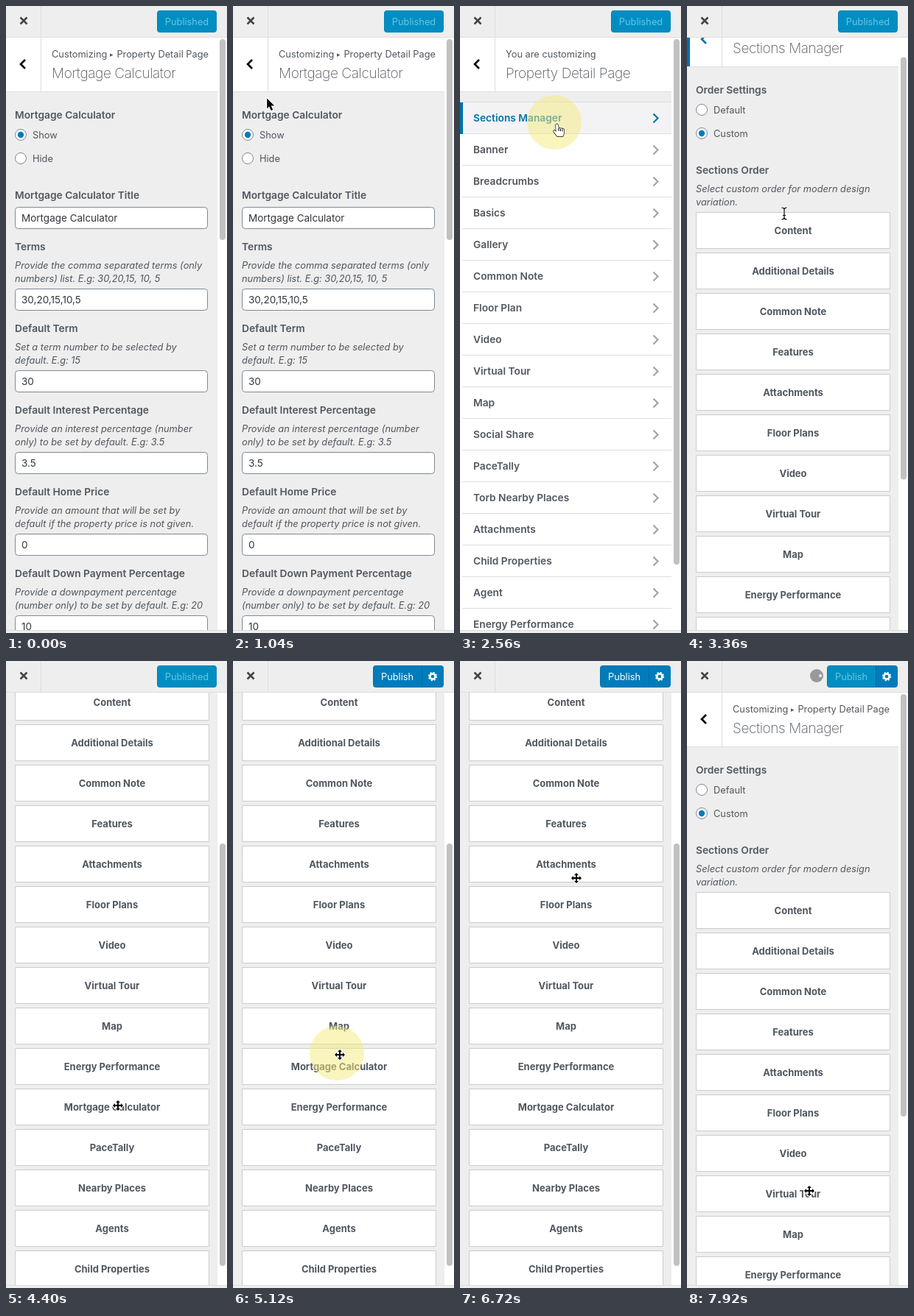
These frames come from a looping animation (300 by 852 pixels, 8 s). An HTML page with a canvas:

```html
<!DOCTYPE html>
<html lang="en">
<head>
<meta charset="utf-8">
<title>Customizer</title>
<style>
html, body { margin: 0; width: 100%; height: 100%; overflow: hidden; background: #eee; }
canvas { display: block; width: 300px; height: 852px; }
</style>
</head>
<body>
<canvas id="stage"></canvas>
<script>
const LOOP = 8000, STEP = 80, PANE = 287;
const BLUE = '#0073aa', INK = '#50575f', LINE = '#ddd';
const canvas = document.getElementById('stage');
const ctx = canvas.getContext('2d');
const ratio = window.devicePixelRatio || 1;
canvas.width = 300 * ratio;
canvas.height = 852 * ratio;

const sections = ['Sections Manager', 'Banner', 'Breadcrumbs', 'Basics', 'Gallery', 'Common Note',
  'Floor Plan', 'Video', 'Virtual Tour', 'Map', 'Social Share', 'PaceTally', 'Torb Nearby Places',
  'Attachments', 'Child Properties', 'Agent', 'Energy Performance', 'Mortgage Calculator', 'Similar Properties'];
const cards = ['Content', 'Additional Details', 'Common Note', 'Features', 'Attachments', 'Floor Plans',
  'Video', 'Virtual Tour', 'Map', 'Energy Performance', 'Mortgage Calculator', 'PaceTally',
  'Nearby Places', 'Agents', 'Child Properties', 'Similar Properties'];
const fields = [
  ['Terms', 'Provide the comma separated terms (only', 'numbers) list. E.g: 30,20,15, 10, 5', '30,20,15,10,5'],
  ['Default Term', 'Set a term number to be selected by', 'default. E.g: 15', '30'],
  ['Default Interest Percentage', 'Provide an interest percentage (number', 'only) to be set by default. E.g: 3.5', '3.5'],
  ['Default Home Price', 'Provide an amount that will be set by', 'default if the property price is not given.', '0'],
  ['Default Down Payment Percentage', 'Provide a downpayment percentage', '(number only) to be set by default. E.g: 20', '10']
];

// Timelines: [time, value...]
const scrollTrack = [[1600, 99], [2000, 0], [3280, 0], [3360, 34], [3600, 226], [4000, 226], [4240, 283],
  [6720, 283], [6880, 0]];
const pointerTrack = [[160, 180, 572], [480, 197, 441], [560, 197, 441], [1120, 21, 73], [2000, 21, 73],
  [2160, 120, 192], [2320, 132, 160], [2960, 132, 160], [3200, 132, 282], [3680, 132, 282],
  [3920, 150, 660], [4000, 150, 660], [4400, 152, 604], [4960, 149, 590], [5120, 145, 535],
  [5360, 144, 545], [5440, 144, 548], [5600, 145, 603], [5840, 146, 603], [6000, 145, 548],
  [6320, 146, 548], [6480, 146, 603], [6560, 147, 600], [6720, 158, 295], [6960, 158, 295],
  [7360, 222, 22], [7520, 222, 22], [7840, 166, 715], [7920, 166, 720]];
const drags = [[4960, 5120], [5440, 5600], [5840, 6000], [6320, 6480]];
const clicks = [[1360, 1480], [2560, 2680], [7360, 7520], ...drags.map(([a, b]) => [a, b + STEP])];

const shapes = {
  arrow: 'M0 0v14l3-3 2.5 5.5 2.5-1-2.5-5.5h4.5z',
  hand: 'M-2 1.5q1.5-2.5 3 0l1 5q1-1 2.5 0 1.5-.8 2.5.5 2-.3 2.3 1.5v3.5l-1.5 5h-8l-4.5-6q-1-2 1.5-2l1.7 2z',
  beam: 'M-3.5-8q3 0 3.5 2q.5-2 3.5-2M0-6v12M-3.5 8q3 0 3.5-2q.5 2 3.5 2M-2 2.5h4',
  move: 'M0-7l3 3h-2v3h3v-2l3 3-3 3v-2h-3v3h2l-3 3-3-3h2v-3h-3v2l-3-3 3-3v2h3v-3h-2z'
};

const clamp = v => Math.min(1, Math.max(0, v));
const ease = v => { v = clamp(v); return v * v * (3 - 2 * v); };
const within = (t, [a, b]) => t >= a && t < b;

function at(track, t) {
  const i = track.findIndex(key => key[0] > t);
  if (i < 0) return track[track.length - 1].slice(1);
  if (i === 0) return track[0].slice(1);
  const a = track[i - 1], b = track[i], p = (t - a[0]) / (b[0] - a[0]);
  return a.slice(1).map((v, k) => v + (b[k + 1] - v) * p);
}

function rect(x, y, w, h, fill) {
  ctx.fillStyle = fill;
  ctx.fillRect(x, y, w, h);
}

function box(x, y, w, h, radius, fill, border) {
  ctx.beginPath();
  ctx.roundRect(x + .5, y + .5, w - 1, h - 1, radius);
  ctx.fillStyle = fill;
  ctx.fill();
  ctx.strokeStyle = border;
  ctx.lineWidth = 1;
  ctx.stroke();
}

function disc(x, y, r, fill) {
  ctx.beginPath();
  ctx.arc(x, y, r, 0, 7);
  ctx.fillStyle = fill;
  ctx.fill();
}

function text(str, x, baseline, font, color = INK, align = 'left') {
  ctx.font = font + ' Inter, sans-serif';
  ctx.fillStyle = color;
  ctx.textAlign = align;
  ctx.fillText(str, x, baseline);
}

function stroke(path, x, y, color, width) {
  ctx.save();
  ctx.translate(x, y);
  ctx.strokeStyle = color;
  ctx.lineWidth = width;
  ctx.stroke(new Path2D(path));
  ctx.restore();
}

const label = (str, y) => text(str, 12, y, '600 13.75px');
const note = (str, y) => text(str, 12, y, 'italic 400 12.8px');

function radio(str, y, checked) {
  ctx.beginPath();
  ctx.arc(20, y, 7.5, 0, 7);
  ctx.fillStyle = '#fff';
  ctx.fill();
  ctx.strokeStyle = '#7e8993';
  ctx.lineWidth = 1;
  ctx.stroke();
  if (checked) disc(20, y, 4.2, '#007cba');
  text(str, 36, y + 5, '400 12.8px');
}

function input(str, y) {
  box(12, y, 262, 30, 4, '#fff', '#7e8993');
  text(str, 21, y + 20, '400 13.5px', '#32373c');
}

function header(trail, title, active) {
  rect(0, 43, PANE, 73, '#fff');
  rect(0, 116, PANE, 1, LINE);
  rect(47, 43, 1, 73, LINE);
  if (active) rect(0, 43, 4, 73, BLUE);
  stroke('M3-6l-6 6 6 6', 23, 79, active ? BLUE : '#000', 2.6);
  if (trail) {
    text('Customizing', 62, 70, '400 12.8px');
    text('▸', 141, 69, '400 9px');
    text('Property Detail Page', 275, 70, '400 12.8px', INK, 'right');
  } else {
    text('You are customizing', 62, 70, '400 12.8px');
  }
  ctx.letterSpacing = '-.4px';
  text(title, 62, 98, '200 19px');
  ctx.letterSpacing = '0px';
}

function calculatorPage(s) {
  header(true, 'Mortgage Calculator', s.overBack);
  label('Mortgage Calculator', 153);
  radio('Show', 175, true);
  radio('Hide', 207, false);
  label('Mortgage Calculator Title', 262);
  input('Mortgage Calculator', 273);
  fields.forEach(([name, first, second, value], i) => {
    const y = 111 * i;
    label(name, 332 + y);
    note(first, 357 + y);
    note(second, 375 + y);
    input(value, 384 + y);
  });
}

function listPage(s) {
  header(false, 'Property Detail Page', s.overBack);
  rect(0, 130, PANE, 1, LINE);
  sections.forEach((name, i) => {
    const y = 131 + 43 * i;
    const active = i === s.row || name === 'Mortgage Calculator';
    rect(0, y, PANE, 43, active ? '#f3f3f5' : '#fff');
    rect(3, y + 42, PANE - 3, 1, LINE);
    if (active) rect(0, y, 4, 43, BLUE);
    text(name, 18, y + 26, '600 13.75px', active ? BLUE : INK);
    stroke('M-3.5-6l6 6-6 6', 266, y + 21.5, active ? BLUE : '#a0a5aa', 2.2);
  });
}

function card(name, y) {
  box(12, y, 264, 50, 0, '#fff', '#ccc');
  text(name, 144, y + 30, '700 13px', INK, 'center');
}

function sortPage(s) {
  header(true, 'Sections Manager', s.focusBack);
  label('Order Settings', 153);
  radio('Default', 175, false);
  radio('Custom', 207, true);
  label('Sections Order', 262);
  note('Select custom order for modern design', 287);
  note('variation.', 305);
  // place: 0 = calculator below its neighbour, 1 = above it
  const [upper, lower] = [9, 10];
  cards.forEach((name, i) => {
    let slot = i;
    if (i === upper) slot += Math.round(s.place);
    if (i !== lower) card(name, 314 + 55 * slot);
  });
  card(cards[lower], 314 + 55 * (lower - s.place));
}

function pane(draw, x, scroll, s) {
  if (Math.abs(x) >= PANE) return;
  ctx.save();
  ctx.beginPath();
  ctx.rect(0, 43, PANE, 805);
  ctx.clip();
  ctx.translate(x, -scroll);
  rect(0, 43, PANE, 1400, '#eee');
  draw(s);
  ctx.restore();
}

function gear(x, y) {
  ctx.strokeStyle = '#fff';
  for (const [r, width, dash] of [[3.6, 2.6, []], [5.3, 1.8, [2.08, 2.08]]]) {
    ctx.beginPath();
    ctx.arc(x, y, r, 0, Math.PI * 2);
    ctx.lineWidth = width;
    ctx.setLineDash(dash);
    ctx.stroke();
  }
  ctx.setLineDash([]);
}

function topBar(t, changed, saving) {
  rect(0, 0, 300, 42, '#eee');
  rect(0, 42, 300, 1, LINE);
  rect(47, 0, 1, 42, LINE);
  stroke('M-4.5-4.5l9 9M4.5-4.5l-9 9', 24, 20, '#444', 2.5);
  if (!changed) {
    box(205, 6, 81, 30, 3, '#008ec2', '#0081b4');
    text('Published', 245.5, 26, '400 12.8px', '#66c6e4', 'center');
    return;
  }
  box(190, 6, 96, 30, 3, '#007cba', '#0073aa');
  if (saving) {
    rect(191, 7, 66, 28, '#008ec2');
    const angle = (t - 7920) / 1000 * Math.PI * 2;
    disc(176, 20, 9, '#999');
    disc(176 + 5 * Math.cos(angle), 20 + 5 * Math.sin(angle), 2, '#eee');
  }
  rect(256, 7, 1, 28, '#006ba1');
  text('Publish', 223, 26, '400 12.8px', saving ? '#66c6e4' : '#fff', 'center');
  gear(271, 21);
}

function pointer(kind, x, y) {
  const path = new Path2D(shapes[kind]);
  ctx.save();
  ctx.translate(x, y);
  ctx.lineJoin = 'round';
  ctx.strokeStyle = kind === 'hand' ? '#000' : '#fff';
  ctx.lineWidth = kind === 'hand' ? 1.3 : 2.4;
  ctx.stroke(path);
  if (kind === 'beam') {
    ctx.strokeStyle = '#000';
    ctx.lineWidth = 1.2;
    ctx.stroke(path);
  } else {
    ctx.fillStyle = kind === 'hand' ? '#fff' : '#000';
    ctx.fill(path);
  }
  if (kind === 'hand') stroke('M2 6v4M4.5 7v3M7 7.5v3', 0, 0, '#000', 1);
  ctx.restore();
}

function pointerKind(x, y, scroll, s) {
  if (y < 42) return x > 190 ? 'hand' : 'arrow';
  if (s.overBack || s.row >= 0) return 'hand';
  if (s.sorting && y + scroll > 320) return 'move';
  if (s.sorting && y + scroll > 234) return 'beam';
  return 'arrow';
}

function draw(t) {
  const [x, y] = at(pointerTrack, t);
  const back = ease((t - 1360) / 200), open = ease((t - 2560) / 240);
  const scroll = back < 1 && t < 1440 ? 0 : at(scrollTrack, t)[0];
  const done = drags.filter(d => t >= d[1]).length;
  const drag = drags.find(d => within(t, d));
  const progress = drag ? (t - drag[0]) / (drag[1] - drag[0]) : 0;
  const onList = back > .5 && open < .5;
  const overBack = t >= 160 && x < 47 && y > 43 && y + scroll < 117;
  const s = {
    overBack,
    focusBack: overBack || t < 4960,
    row: onList ? Math.floor((y + scroll - 131) / 43) : -1,
    sorting: open > .5,
    place: done % 2 ? 1 - progress : progress
  };

  rect(0, 0, 300, 852, '#eee');
  rect(PANE, 43, 13, 805, '#fff');
  rect(PANE - 1, 43, 1, 805, LINE);
  pane(calculatorPage, PANE * back, 0, s);
  pane(listPage, PANE * (back - 1 - open), scroll, s);
  pane(sortPage, PANE * (1 - open), scroll, s);

  const [length, rate] = s.sorting ? [574, .717] : onList ? [714, .88] : [273, 0];
  ctx.beginPath();
  ctx.roundRect(290, 45 + scroll * rate, 8, length, 4);
  ctx.fillStyle = '#c1c1c1';
  ctx.fill();

  rect(0, 848, 300, 1, LINE);
  rect(0, 849, 300, 3, '#eee');
  topBar(t, done > 0, t >= 7520);

  if (clicks.some(c => within(t, c))) disc(x - 4, y - 2, 37, 'rgba(246,236,125,.5)');
  if (t >= 160) pointer(pointerKind(x, y, scroll, s), x, y);
}

function tick() {
  const t = performance.now() % LOOP;
  ctx.setTransform(ratio, 0, 0, ratio, 0, 0);
  draw(Math.floor(t / STEP) * STEP);
  requestAnimationFrame(tick);
}
tick();
</script>
</body>
</html>
```
